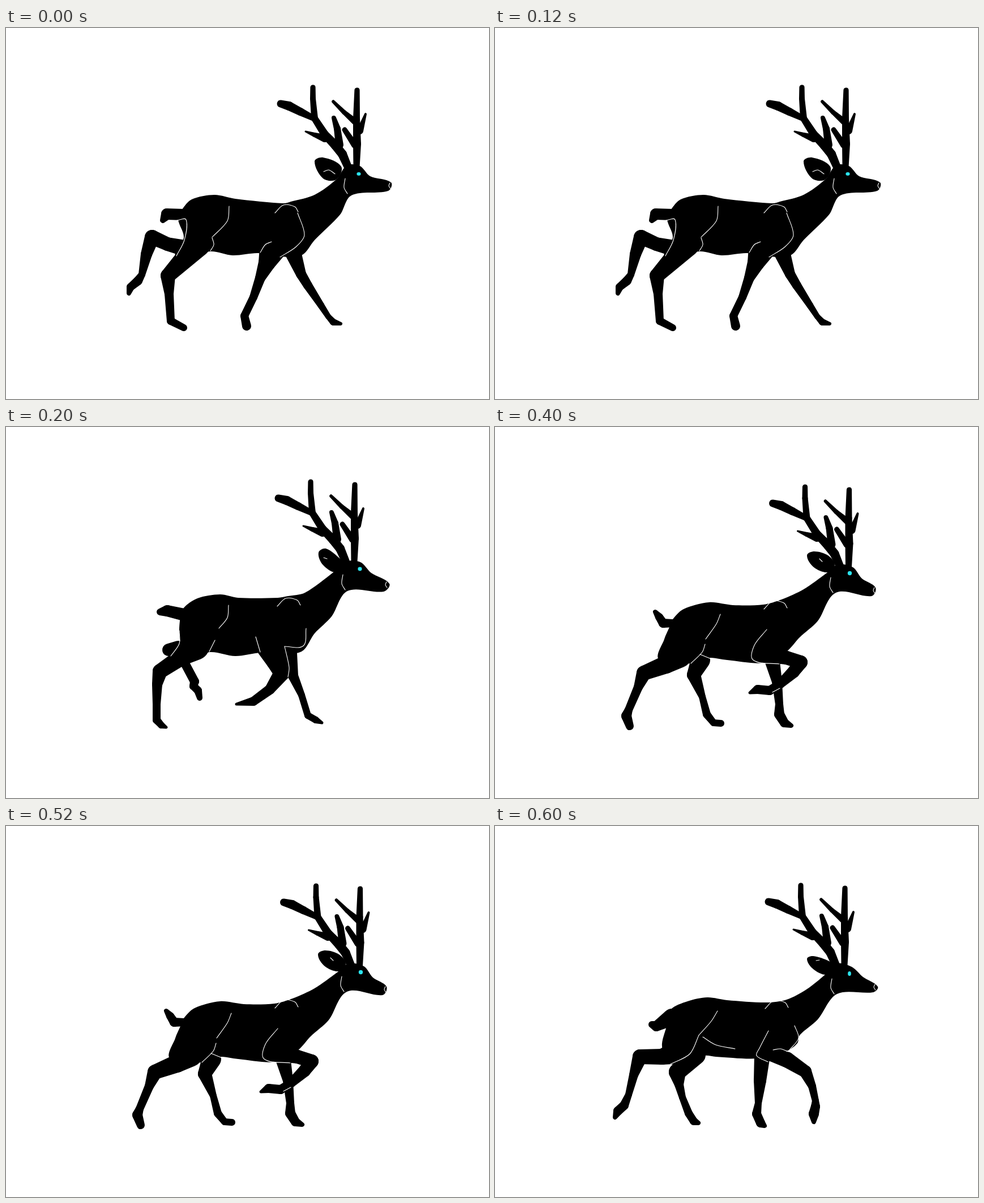
An HTML page with a canvas that plays this animation: 853x656 px, repeating every 0.8 s.

```html
<!DOCTYPE html>
<html lang="en">
<head>
<meta charset="utf-8">
<title>Walking deer</title>
<style>
html, body { margin: 0; width: 100%; height: 100%; overflow: hidden; background: #fff; }
canvas { display: block; width: 853px; height: 656px; }
</style>
</head>
<body>
<canvas id="stage" width="853" height="656"></canvas>
<script>
const ctx = document.getElementById('stage').getContext('2d');
const HOLD = 200;

// Smooth curve through points; handles scale with each segment.
function trace(v, closed) {
  const n = v.length / 2;
  const at = i => {
    const k = closed ? (i + n) % n : Math.max(0, Math.min(n - 1, i));
    return [v[2 * k], v[2 * k + 1]];
  };
  const handle = (i, len) => {
    const [ax, ay] = at(i - 1), [bx, by] = at(i + 1);
    const k = len * 0.3 / (Math.hypot(bx - ax, by - ay) || 1);
    return [(bx - ax) * k, (by - ay) * k];
  };
  ctx.beginPath();
  ctx.moveTo(...at(0));
  for (let i = 0; i < (closed ? n : n - 1); i++) {
    const [ax, ay] = at(i), [bx, by] = at(i + 1);
    const len = Math.hypot(bx - ax, by - ay);
    const [ux, uy] = handle(i, len), [wx, wy] = handle(i + 1, len);
    ctx.bezierCurveTo(ax + ux, ay + uy, bx - wx, by - wy, bx, by);
  }
}

function blob(...v) {
  trace(v, true);
  ctx.fill();
}

function line(...v) {
  trace(v, false);
  ctx.stroke();
}

// Chain of joints (x, y, radius) joined by tapered capsules.
function limb(...v) {
  for (let i = 0; i + 5 < v.length; i += 3) {
    const [ax, ay, ar, bx, by, br] = v.slice(i, i + 6);
    const dist = Math.hypot(bx - ax, by - ay);
    const dir = Math.atan2(by - ay, bx - ax);
    const tilt = Math.acos(Math.max(-1, Math.min(1, (ar - br) / dist)));
    ctx.beginPath();
    ctx.arc(ax, ay, ar, dir + tilt, dir - tilt + Math.PI * 2);
    ctx.arc(bx, by, br, dir - tilt, dir + tilt);
    ctx.fill();
  }
}

function shifted(dx, dy, paint) {
  ctx.save();
  ctx.translate(dx, dy);
  paint();
  ctx.restore();
}

function antlers() {
  limb(604, 246, 7, 594, 223, 8, 582, 208, 8, 563, 188, 7, 545, 160, 6, 542, 125, 5, 542, 105, 4.6);
  limb(546, 161, 5, 520, 148, 7, 500, 138, 8, 485, 134, 6.5);
  limb(563, 195, 7, 545, 189, 4, 529, 183, 1.5);
  limb(589, 207, 7, 585, 178, 6, 579, 159, 4);
  limb(619, 246, 5.5, 620, 205, 7, 619, 160, 6, 620, 110, 4.6);
  limb(618, 167, 6, 597, 149, 4, 578, 130, 2.8);
  limb(625, 182, 6, 635, 152, 2);
  limb(616, 207, 6, 598, 180, 4.5);
}
const shoulder = () => line(475, 327, 490, 313, 510, 316, 516, 325);
const cheek = () => line(599, 266, 597, 282, 603, 293);
const nose = () => line(678, 274, 676, 279, 679, 284);

function eye(x, y, rx, ry) {
  ctx.fillStyle = '#2be4ee';
  ctx.beginPath();
  ctx.ellipse(x, y, rx, ry, 0, 0, Math.PI * 2);
  ctx.fill();
}

function kick() {
  blob(311, 321, 328, 303, 368, 295, 405, 302, 490, 310, 503, 307, 545, 295, 584, 267,
    602, 243, 625, 244, 643, 262, 680, 273, 675, 288, 610, 296, 590, 330, 545, 375,
    522, 402, 485, 404, 445, 398, 400, 402, 362, 395, 301, 404, 314, 370, 304, 338);
  blob(583, 268, 560, 266, 545, 236, 560, 229, 592, 245);
  limb(277, 340, 5, 284, 329, 10, 315, 330, 10);
  limb(340, 383, 21, 286, 438, 13, 288, 470, 8, 291, 518, 7, 314, 530, 6);
  limb(310, 388, 14, 285, 382, 12, 258, 370, 13, 248, 400, 10, 240, 436, 6, 233, 447, 8, 220, 458, 7, 217, 469, 4);
  limb(472, 388, 24, 461, 415, 15, 449, 442, 9, 437, 476, 7, 421, 509, 7, 425, 527, 8);
  limb(508, 400, 14, 521, 435, 9, 533, 455, 8, 556, 490, 6, 569, 510, 5, 578, 520, 6, 591, 523, 3);
  shifted(0, 0, antlers);

  line(394, 315, 391, 341, 364, 370);
  line(364, 371, 367, 383, 361, 394);
  line(515, 327, 527, 366, 512, 387, 484, 405);
  line(469, 378, 458, 383, 449, 397);
  line(302, 340, 318, 339, 315, 375, 301, 403);
  line(561, 254, 570, 251, 581, 258);
  shifted(0, 0, shoulder);
  shifted(0, 0, cheek);
  shifted(0, 0, nose);
  eye(623, 258, 3.6, 3);
}

function gather() {
  blob(313, 321, 338, 303, 378, 296, 410, 302, 480, 302, 498, 299, 528, 293, 578, 257,
    600, 238, 626, 239, 645, 258, 677, 277, 667, 291, 603, 290, 575, 335, 545, 365,
    522, 397, 480, 400, 450, 399, 405, 405, 360, 398, 320, 412, 307, 375, 307, 343);
  blob(582, 257, 559, 243, 552, 222, 565, 215, 590, 233, 597, 243);
  limb(272, 327, 6, 285, 325, 10, 315, 332, 11);
  limb(335, 388, 24, 308, 408, 15, 272, 432, 13, 267, 455, 9, 266, 490, 7, 266, 518, 7, 274, 527, 6, 283, 531, 2.5);
  limb(316, 418, 8, 333, 450, 8, 331, 458, 7, 339, 466, 7, 342, 479, 5);
  limb(287, 394, 11, 304, 390, 12);
  limb(468, 385, 27, 479, 412, 20, 487, 435, 14, 466, 464, 9, 437, 485, 8, 407, 490, 2.5);
  limb(505, 400, 9, 507, 440, 9, 522, 474, 6, 533, 510, 6, 547, 518, 6, 558, 523, 2.5);
  shifted(-4, -8, antlers);

  line(393, 315, 391, 337, 376, 356);
  line(369, 377, 359, 397);
  line(530, 356, 525, 387, 492, 388);
  line(492, 388, 500, 425, 498, 442);
  line(441, 371, 449, 398);
  line(306, 360, 306, 383, 291, 405);
  line(561, 231, 567, 233);
  shifted(4, -10, shoulder);
  shifted(-4, -5, cheek);
  shifted(-6, 0, nose);
  eye(625, 251, 3.6, 3.4);
}

function lift() {
  blob(314, 340, 333, 322, 378, 310, 420, 315, 474, 314, 506, 305, 545, 287, 586, 258,
    605, 243, 632, 248, 648, 268, 672, 284, 665, 299, 602, 293, 570, 343, 538, 372,
    515, 397, 478, 417, 410, 412, 372, 408, 345, 418, 290, 412, 299, 375, 308, 354);
  blob(588, 257, 563, 248, 551, 227, 564, 220, 588, 227, 600, 244);
  limb(283, 327, 4, 290, 336, 7, 297, 347, 8, 315, 347, 7);
  limb(325, 404, 22, 302, 420, 16, 263, 435, 13, 253, 460, 8, 236, 500, 7, 232, 511, 9, 238, 529, 7);
  limb(363, 412, 17, 351, 438, 12, 366, 477, 6, 374, 508, 7, 386, 523, 6, 399, 524, 6);
  limb(480, 398, 18, 515, 408, 12, 540, 416, 12, 527, 433, 11, 503, 455, 8, 485, 466, 8, 464, 464, 8, 450, 470, 2.5);
  limb(490, 415, 13, 498, 450, 9, 502, 490, 7, 502, 508, 9, 511, 523, 8, 523, 528, 4);
  shifted(5.5, 1, antlers);

  line(398, 331, 391, 348, 372, 375);
  line(371, 384, 366, 398, 346, 418);
  line(362, 402, 384, 411);
  line(480, 358, 458, 386, 456, 412, 502, 419);
  line(490, 469, 503, 462);
  line(573, 233, 578, 238);
  shifted(0, -5, shoulder);
  shifted(-6, 0, cheek);
  shifted(-8, 10, nose);
  eye(626.5, 258.5, 3.7, 3.7);
}

function reach() {
  blob(310, 325, 340, 310, 375, 303, 410, 308, 480, 312, 515, 307, 550, 289, 584, 262,
    603, 243, 630, 249, 650, 267, 676, 284, 668, 294, 604, 297, 570, 342, 538, 370,
    534, 384, 515, 398, 465, 411, 390, 408, 370, 406, 310, 421, 295, 390, 303, 354);
  blob(586, 263, 562, 253, 551, 235, 562, 230, 590, 239, 598, 248);
  limb(277, 351, 6, 285, 354, 9, 312, 338, 15);
  limb(330, 398, 22, 295, 408, 14, 256, 408, 13, 245, 440, 8, 236, 475, 6, 228, 494, 8, 217, 504, 8, 212, 515, 4);
  limb(355, 405, 17, 322, 435, 15, 325, 457, 8, 331, 480, 6, 342, 508, 7, 351, 522, 7, 359, 525, 4);
  limb(490, 405, 12, 515, 413, 14, 548, 434, 11, 560, 460, 7, 566, 486, 6, 566, 496, 8, 563, 509, 9, 563, 523, 4);
  limb(472, 405, 14, 468, 450, 11, 465, 490, 6, 462, 509, 8, 469, 525, 8, 476, 530, 4);
  shifted(-2, 0, antlers);

  line(393, 327, 382, 345, 360, 370);
  line(360, 370, 344, 403, 310, 421);
  line(367, 373, 390, 387, 424, 394);
  line(483, 362, 467, 393, 462, 406, 482, 417);
  line(491, 396, 504, 394, 518, 399);
  line(529, 353, 536, 375, 520, 396);
  line(567, 238, 573, 237);
  shifted(2, -4, shoulder);
  shifted(-4, 4, cheek);
  shifted(-7, 6, nose);
  eye(626, 261, 2.9, 3.9);
}

const poses = [kick, gather, lift, reach];

function draw(pose) {
  ctx.fillStyle = '#fff';
  ctx.fillRect(0, 0, 853, 656);
  ctx.fillStyle = '#000';
  ctx.strokeStyle = '#fff';
  ctx.lineWidth = 1.1;
  ctx.lineCap = 'round';
  pose();
}

let start;
function tick(now) {
  start ??= now;
  draw(poses[Math.floor((now - start) / HOLD) % poses.length]);
  requestAnimationFrame(tick);
}
draw(poses[0]);
requestAnimationFrame(tick);
</script>
</body>
</html>
```
